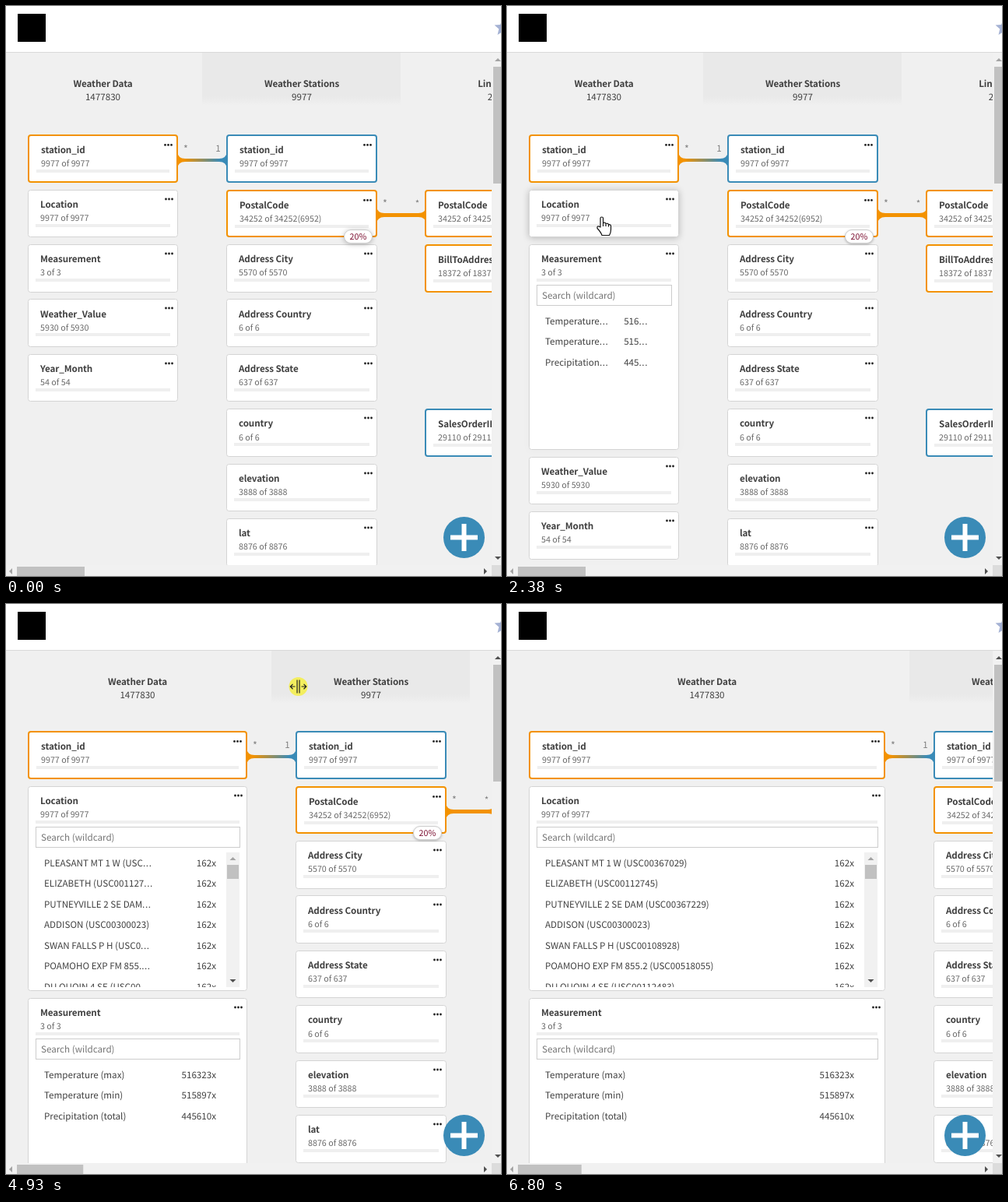
These frames come from a looping animation (636 px wide and 732 px high, 8000 ms). An HTML page:

```html
<!DOCTYPE html>
<html lang="en">
<head>
<meta charset="utf-8">
<title>Data model viewer</title>
<style>
  html, body { margin: 0; width: 100%; height: 100%; overflow: hidden; background: #f0f0f0; }
  svg { display: block; }
  text { white-space: pre; text-rendering: geometricPrecision; }
</style>
</head>
<body>
<svg id="stage" width="636" height="732" viewBox="0 0 636 732"></svg>
<script>
const stage = document.getElementById('stage');
const pen = document.createElement('canvas').getContext('2d');

const LOOP = 8000, STEP = 77.3;
const FONT = "'Noto Sans CJK JP','Noto Sans CJK SC','Noto Sans CJK KR','Noto Sans CJK TC','Open Sans',sans-serif";
const TIP_FONT = "'Open Sans','Noto Sans',sans-serif";
const ZOOM = 1 / 1.117;   // the CJK family draws its Latin letters larger
const ORANGE = '#f39200', BLUE = '#3a8bb7', INK = '#404040', GREY = '#6a6a6a';
const PITCH = 70.4, CARD_H = 61.6, GROW = 202.1;

const columns = [
  { title: 'Weather Data', rows: '1477830', cards: [
    ['station_id', '9977 of 9977', ORANGE],
    ['Location', '9977 of 9977'],
    ['Measurement', '3 of 3'],
    ['Weather_Value', '5930 of 5930'],
    ['Year_Month', '54 of 54']] },
  { title: 'Weather Stations', rows: '9977', cards: [
    ['station_id', '9977 of 9977', BLUE],
    ['PostalCode', '34252 of 34252(6952)', ORANGE],
    ['Address City', '5570 of 5570'],
    ['Address Country', '6 of 6'],
    ['Address State', '637 of 637'],
    ['country', '6 of 6'],
    ['elevation', '3888 of 3888'],
    ['lat', '8876 of 8876']] },
  { title: 'Link Table', rows: '29110', cards: [
    null,
    ['PostalCode', '34252 of 34252', ORANGE],
    ['BillToAddressID', '18372 of 18372', ORANGE],
    null, null,
    ['SalesOrderID', '29110 of 29110', BLUE]] }
];

const lists = {
  Location: ['PLEASANT MT 1 W (USC00367029)', 'ELIZABETH (USC00112745)',
    'PUTNEYVILLE 2 SE DAM (USC00367229)', 'ADDISON (USC00300023)',
    'SWAN FALLS P H (USC00108928)', 'POAMOHO EXP FM 855.2 (USC00518055)',
    'DU QUOIN 4 SE (USC00112483)'].map(n => [n, '162x']),
  Measurement: [['Temperature (max)', '516323x'], ['Temperature (min)', '515897x'],
    ['Precipitation (total)', '445610x']]
};

// Tracks: [time, value, ...]
const tracks = {
  mouse: [[1210, 628, 182], [1300, 560, 195], [1500, 330, 255], [1700, 150, 325], [1830, 119, 332],
    [2070, 119, 332], [2250, 122, 271], [2870, 122, 271], [2920, 126, 296], [3000, 122, 330],
    [3140, 108, 365], [3440, 108, 365], [3850, 240, 100], [4000, 256, 66], [4150, 254, 81],
    [4280, 254, 81], [4440, 248, 83], [4690, 248, 83], [4770, 262, 85], [4850, 312, 95],
    [4933, 375.5, 106], [5010, 398, 110], [5150, 405, 111], [5300, 405, 111], [5551, 484, 135],
    [6100, 514, 136], [6600, 514, 136], [6634, 390, 80], [6711, 162, 23]],
  shift: [[4690, 0], [4770, 10], [4850, 42], [4933, 89], [5010, 138], [5150, 156], [5300, 158],
    [5551, 236], [6100, 262], [6180, 265]],
  scroll: [[2480, 0], [2600, 2]],
  nameWidth: [[0, 83.4], [89, 140.2], [236, 216], [265, 236]]
};
const openAt = { Measurement: [[1850, 0], [1990, 1]], Location: [[2440, 0], [2600, 1]] };
const hoverAt = {
  Measurement: [[1500, 0], [1800, 1], [2150, 1], [2400, 0]],
  Location: [[2200, 0], [2450, 1], [3500, 1], [3800, 0]]
};
const pointers = [[0, ''], [1200, 'arrow'], [1560, 'hand'], [2900, 'beam'], [2985, 'hand'],
  [4430, 'resize'], [6600, 'hand'], [6680, 'arrow'], [6760, '']];

function track(keys, t) {
  if (!keys) return [0];
  if (t <= keys[0][0]) return keys[0].slice(1);
  for (let i = 1; i < keys.length; i++) {
    const a = keys[i - 1], b = keys[i];
    if (t < b[0]) {
      const p = (t - a[0]) / (b[0] - a[0]);
      return a.slice(1).map((v, j) => v + (b[j + 1] - v) * p);
    }
  }
  return keys[keys.length - 1].slice(1);
}

const rect = (x, y, w, h, fill, more = '') =>
  `<rect x="${x}" y="${y}" width="${w}" height="${h}" fill="${fill}" ${more}/>`;
const path = (d, more) => `<path d="${d}" ${more}/>`;
const box = (x, y, w, h, inner) => `<svg x="${x}" y="${y}" width="${w}" height="${h}">${inner}</svg>`;

function text(x, y, str, size, fill, anchor = 'start', bold = false) {
  const weight = bold ? 'font-weight="600" letter-spacing="-.1"' : '';
  return `<text x="${x}" y="${y}" font-family="${FONT}" font-size="${size * ZOOM}" fill="${fill}" text-anchor="${anchor}" ${weight}>${str}</text>`;
}

// Shortens a label to the given width
function fit(str, max) {
  pen.font = `${13 * ZOOM}px ${FONT}`;
  const width = s => pen.measureText(s).width;
  if (width(str) <= max) return str;
  let n = str.length;
  while (n && width(str.slice(0, n)) + 11.6 > max) n--;
  return str.slice(0, n) + '<tspan letter-spacing=".6">...</tspan>';
}

function tri(x, y, turn, fill) {
  return path('M-4 2L0 -2L4 2Z', `fill="${fill}" transform="translate(${x} ${y}) rotate(${turn})"`);
}

function listBody(name, w, shift) {
  const nameMax = track(tracks.nameWidth, shift)[0];
  let items = lists[name].map(([label, count], i) => {
    const y = 17.8 + 26.45 * i;
    return text(21, y, fit(label, nameMax), 13, INK) +
      text(w - 40, y, fit(count, 34 + shift * .3), 13, INK, 'end');
  }).join('');
  if (name === 'Location') {
    items += rect(w - 27, 0, 17, 173, '#f1f1f1') + rect(w - 26, 16, 15, 18, '#c1c1c1') +
      tri(w - 18.5, 8, 0, '#a3a3a3') + tri(w - 18.5, 165, 180, '#505050');
  }
  return rect(10.5, 4.5, w - 20, 26, '#fff', 'stroke="#ccc"') +
    text(17, 22, 'Search (wildcard)', 13, '#757575') + box(0, 37, w, 173, items);
}

function card([name, count, edge], x, y, w, open, hover, shift) {
  const top = Math.floor(y), h = Math.floor(y + CARD_H + GROW * open) - top;
  const line = edge ? 2 : 1, k = edge ? 1 : 0;
  const shade = hover ? `style="filter:drop-shadow(0 1px 4px rgba(0,0,0,${.32 * hover}))"` : '';
  let out = rect(x + line / 2, top + line / 2, w - line, h - line, '#fff',
    `rx="3" stroke="${edge || '#d4d4d4'}" stroke-width="${line}" ${shade}`);
  out += text(x + 16 + k, y + 22.7 + .7 * k, name, 13, INK, 'start', true);
  out += text(x + 16 + k, y + 39.8 + .7 * k, count, 12, GREY);
  out += rect(x + 10 + k, Math.floor(y + 44 + k), w - 20 - 2 * k, 4, '#efefef');
  for (let i = -1; i < 2; i++)
    out += `<circle cx="${x + w - 11.5 - k + 4 * i}" cy="${top + 12 + k * 1.4}" r="1.4" fill="#222"/>`;
  if (open > .05) out += box(x, top + 48, w, Math.max(0, h - 50), listBody(name, w, shift));
  return out;
}

function link(x, y, fill, thick, right) {
  const a = y - thick / 2, b = y + thick / 2, e = x + 62;
  return path(`M${x - 1} ${y - 11}Q${x} ${a} ${x + 9} ${a}H${e - 9}Q${e} ${a} ${e + 1} ${y - 11}` +
    `V${y + 11}Q${e} ${b} ${e - 9} ${b}H${x + 9}Q${x} ${b} ${x - 1} ${y + 11}Z`, `fill="${fill}"`) +
    text(x + 10, y - 10, '*', 14, '#808080', 'middle') +
    text(x + 51.5, y - (right === '*' ? 10 : 11.5), right, 13, '#808080', 'middle');
}

function column(col, x, w, y, t, shift) {
  let out = text(x + w / 2, 104, col.title, 13, INK, 'middle', true) +
    text(x + w / 2, 121, col.rows, 13, INK, 'middle');
  const grows = col === columns[0];
  for (const c of col.cards) {
    const open = grows ? track(openAt[c[0]], t)[0] : 0;
    const hover = grows ? track(hoverAt[c[0]], t)[0] : 0;
    if (c && y < 718) out += card(c, x, y, w, open, hover, shift);
    y += PITCH + GROW * open;
  }
  return out;
}

function badge(x, y, strong) {
  return rect(x - 18, y - 8.5, 36, 17, '#fff',
    `rx="8.5" stroke="#ccc" style="filter:drop-shadow(0 1px ${strong ? 3 : 1.5}px rgba(0,0,0,.25))"`) +
    text(x, y + 4.2, '20%', 12, '#7d1233', 'middle');
}

function scrollbars(shift, scroll) {
  return rect(625, 60, 11, 658, '#f1f1f1') + rect(626, 78, 10, 150, '#c1c1c1') +
    tri(632, 69, 0, scroll ? '#505050' : '#a3a3a3') + tri(632, 709, 180, '#505050') +
    rect(0, 718, 624, 14, '#f1f1f1') + rect(14, 720, 87 - shift * .02, 12, '#c1c1c1') +
    tri(6, 726, -90, '#a3a3a3') + tri(616, 726, 90, '#505050') + rect(624, 718, 12, 14, '#dcdcdc');
}

function topBar() {
  const star = [...Array(10).keys()].map(i => {
    const r = i % 2 ? 5 : 11, a = Math.PI * (i / 5 - .5);
    return `${638 + r * Math.cos(a)},${28 + r * Math.sin(a)}`;
  }).join(' ');
  return rect(0, 0, 636, 59, '#fff') + rect(0, 59, 636, 1, '#d9d9d9') +
    rect(15, 10, 36, 36, '#000') + `<polygon points="${star}" fill="#a5b2d4"/>`;
}

function tooltip() {
  const lines = ['Table Weather Stations', 'Row count: 9977',
    'Fields: Address City, Address Country, Address State, country, elevation, lat, lon'];
  return rect(253.5, 105.5, 400, 79, '#fff',
    'stroke="#767676" style="filter:drop-shadow(1px 2px 1.5px rgba(0,0,0,.35))"') +
    lines.map((s, i) => `<text x="259" y="${119 + 30 * i}" font-family="${TIP_FONT}" font-size="11.3" fill="#575757">${s}</text>`).join('');
}

const shapes = {
  hand: path('M-2 13V1.5Q-2 0 -.3 0Q1.5 0 1.5 1.5V7.5Q4.5 6.5 5 8.5Q8 7.7 8.5 9.7Q11.5 9 11.5 12V16' +
    'Q11.5 20 9.5 23.5H0Q-1 20 -6 14.5Q-6.5 11.5 -4 12ZM1.5 7.5V12M5 8.5V12M8.5 9.7V12.5',
    'fill="#fff" stroke="#111" stroke-width="1.2" stroke-linejoin="round"'),
  arrow: path('M0 0V16L4 12.5L6.5 18L9 17L6.5 11.5H11.5Z', 'fill="#fff" stroke="#111"'),
  beam: path('M-3 -7.5H-1L0 -6.5L1 -7.5H3M0 -6.5V6.5M-3 7.5H-1L0 6.5L1 7.5H3',
    'fill="none" stroke="#111" stroke-width="1.3"'),
  resize: path('M-1.5 -8.5V8.5M1.5 -8.5V8.5M-4 0H-10M-7 -3.2L-10.2 0L-7 3.2M4 0H10M7 -3.2L10.2 0L7 3.2',
    'fill="none" stroke="#222" stroke-width="1.2"')
};

function pointer(t) {
  const kind = pointers.filter(p => p[0] <= t).pop()[1];
  if (!kind) return '';
  const [x, y] = track(tracks.mouse, t);
  const ring = t > 4600 && t < 6465 ? '<circle r="12" fill="#f5ee45" opacity=".85"/>' : '';
  return `<g transform="translate(${x} ${y})">${ring}${shapes[kind]}</g>`;
}

function draw(t) {
  const shift = Math.round(track(tracks.shift, t)[0]);
  const scroll = track(tracks.scroll, t)[0];
  const y = 165.7 - scroll, x1 = 283 + shift, x2 = x1 + 255;
  const content = rect(252 + shift, 0, 255, 128, 'url(#band)') +
    column(columns[0], 28, 193 + shift, y, t, shift) +
    column(columns[1], x1, 194, y, t, shift) +
    column(columns[2], x2, 194, y, t, shift) +
    link(x1 - 62, y + 32.3, 'url(#blend)', 4, '1') +
    link(x2 - 61, y + PITCH + 32.3, ORANGE, 5, '*') +
    badge(x1 + 169.5, y + PITCH + 60, t < 400);
  stage.innerHTML = `<defs>
    <linearGradient id="band" gradientUnits="userSpaceOnUse" x1="0" y1="60" x2="0" y2="128">
      <stop offset=".82" stop-color="#e9e9e9"/><stop offset="1" stop-color="#f0f0f0"/></linearGradient>
    <linearGradient id="blend" gradientUnits="userSpaceOnUse" x1="${x1 - 55}" y1="0" x2="${x1 - 8}" y2="0">
      <stop offset="0" stop-color="${ORANGE}"/><stop offset="1" stop-color="${BLUE}"/></linearGradient></defs>` +
    rect(0, 0, 636, 732, '#f0f0f0') + box(0, 0, 624, 718, content) + topBar() +
    scrollbars(shift, scroll) +
    `<circle cx="588.5" cy="682.5" r="26.5" fill="${BLUE}"/>` +
    path('M571 682.5H606M588.5 665V700', 'stroke="#fff" stroke-width="6"') +
    (t > 4130 && t < 4290 ? tooltip() : '') + pointer(t);
}

const start = performance.now();
let last = -1;
function tick() {
  const t = Math.max(0, performance.now() - start) % LOOP;
  const step = Math.floor((t + 24) / STEP);
  if (step !== last) draw(Math.max(0, step * STEP - 14));
  last = step;
  requestAnimationFrame(tick);
}
tick();
</script>
</body>
</html>
```
